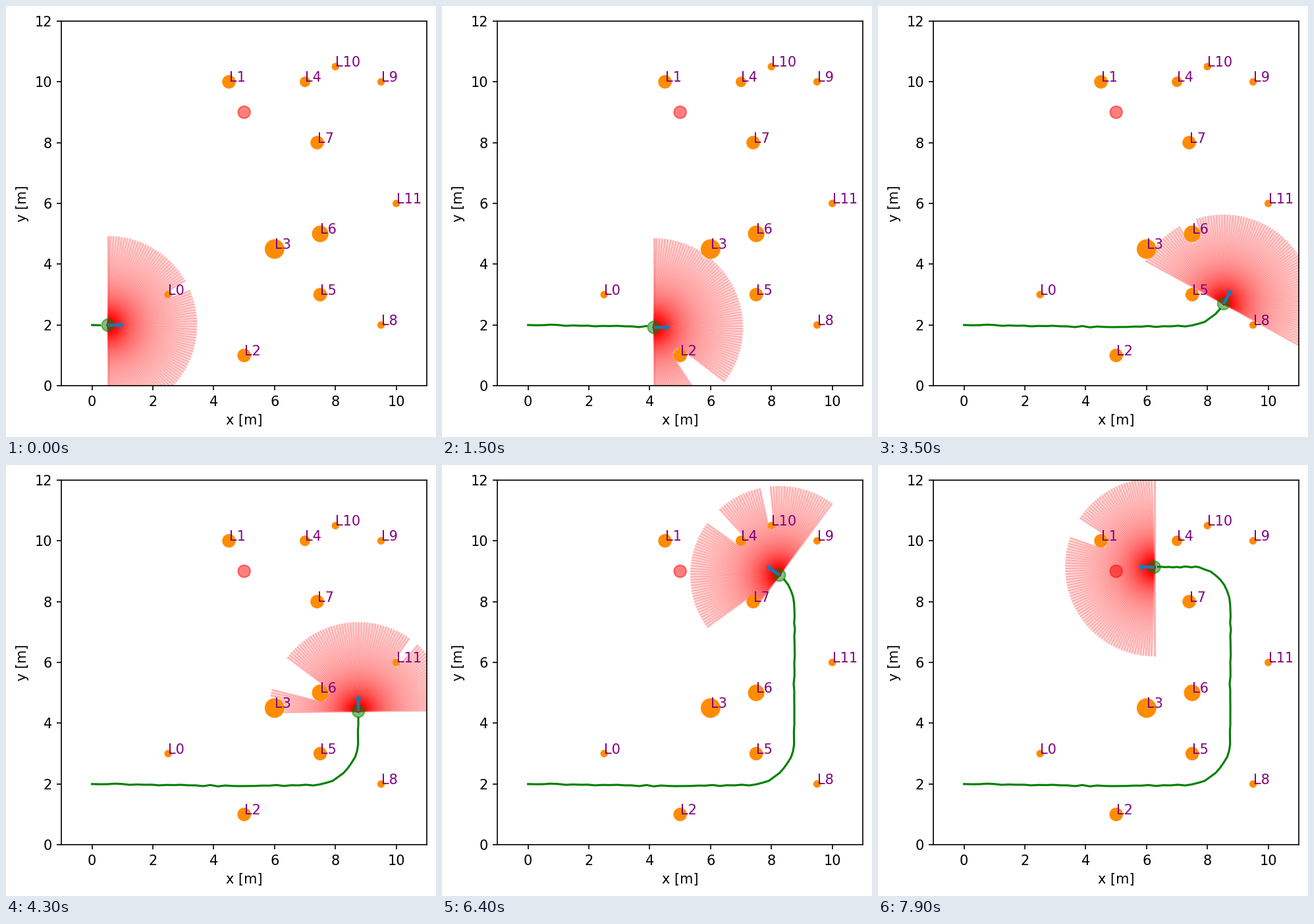
A matplotlib script for the animation above (8000 ms loop, 653 by 655 pixels).

```python
import numpy as np
import matplotlib.pyplot as plt
from matplotlib.animation import FuncAnimation
from matplotlib.collections import LineCollection
from matplotlib.patches import Circle, FancyArrow

W, H, DPI = 653, 655, 150
SIDE = 554.4
FRAMES = 80
RAYS = 100
REACH = np.arange(0, 3, 0.1)
START, GOAL = (0, 2), (5, 9)

# x, y, radius
LANDMARKS = np.array([
    (2.5, 3, .1), (4.5, 10, .2), (5, 1, .2), (6, 4.5, .3),
    (7, 10, .15), (7.5, 3, .2), (7.5, 5, .25), (7.4, 8, .2),
    (9.5, 2, .1), (9.5, 10, .1), (8, 10.5, .1), (10, 6, .1)])

# Distance driven by step: cruise, slower turns, slow approach
PACE = ([0, 2, 30, 45, 55, 66, 69, 81],
        [0, .52, 7.27, 10.52, 12.8, 15.1, 15.67, 17.14])
# Heading in degrees by distance: three straights joined by two arcs
TURNS = ([7.3, 9.595, 14, 15.95], [0, 90.7, 90.7, 180])


def course(dist):
    return np.radians(np.interp(dist, *TURNS))


def drive(dist):
    """Integrate the course, then add a slow drift and a small wobble."""
    ds = 0.005
    theta = course(np.arange(0, 18, ds) + ds / 2)
    grid = np.arange(len(theta) + 1) * ds
    x = START[0] + np.r_[0, np.cumsum(np.cos(theta))] * ds
    y = START[1] + np.r_[0, np.cumsum(np.sin(theta))] * ds
    side = -0.06 * np.sin(np.pi * dist / 9.4) ** 2
    side[1:] += np.random.default_rng(4).normal(0, 0.01, len(dist) - 1)
    ang = course(dist)
    return np.c_[np.interp(dist, grid, x) - side * np.sin(ang),
                 np.interp(dist, grid, y) + side * np.cos(ang)]


def scan(pos, heading):
    """Step along each ray until it enters a landmark."""
    ang = heading + np.linspace(-np.pi / 2, np.pi / 2, RAYS)
    dirs = np.c_[np.cos(ang), np.sin(ang)]
    pts = pos + REACH[None, :, None] * dirs[:, None, :]
    gap = np.linalg.norm(pts[:, :, None] - LANDMARKS[:, :2], axis=-1)
    hit = (gap < LANDMARKS[:, 2]).any(axis=-1)
    last = np.where(hit.any(axis=1), hit.argmax(axis=1) - 1, len(REACH) - 1)
    ends = pos + REACH[last][:, None] * dirs
    return np.stack([np.broadcast_to(pos, ends.shape), ends], axis=1)


DIST = np.interp(np.arange(FRAMES + 2), *PACE)
ROUTE = drive(DIST)
HEADING = course(DIST + 0.06)

fig = plt.figure(figsize=((W + 1e-6) / DPI, (H + 1e-6) / DPI), dpi=DPI)
ax = fig.add_axes([84.45 / W, 77.76 / H, SIDE / W, SIDE / H])
ax.set(xlim=(-1, 11), ylim=(0, 12), xlabel="x [m]", ylabel="y [m]",
       xticks=range(0, 11, 2), yticks=range(0, 13, 2))

for i, (x, y, r) in enumerate(LANDMARKS):
    ax.add_patch(Circle((x, y), r, color="darkorange", zorder=1))
    ax.text(x, y, f"L{i}", color="purple")
ax.add_patch(Circle(GOAL, 0.2, color="red", alpha=0.5, zorder=1))

beams = LineCollection([], colors="red", alpha=0.3, linewidths=1.5,
                       capstyle="projecting", zorder=0.5)
ax.add_collection(beams, autolim=False)
trail, = ax.plot([], [], color="green", lw=1.5, zorder=2)
robot = ax.add_patch(Circle(START, 0.2, color="green", alpha=0.5, zorder=1.5))
arrow = ax.add_patch(FancyArrow(*START, 0.52, 0, width=0.1, head_width=0.28,
                                head_length=0.14, length_includes_head=True,
                                fc="C0", ec="none", zorder=2.5))


def update(frame):
    step = frame + 2
    pos, heading = ROUTE[step], HEADING[step]
    beams.set_segments(scan(pos, heading))
    trail.set_data(*ROUTE[:step].T)
    robot.center = tuple(pos)
    arrow.set_data(x=pos[0], y=pos[1],
                   dx=0.52 * np.cos(heading), dy=0.52 * np.sin(heading))
    return beams, trail, robot, arrow


anim = FuncAnimation(fig, update, frames=FRAMES, interval=100,
                     repeat=True, repeat_delay=0)
plt.show()
```
